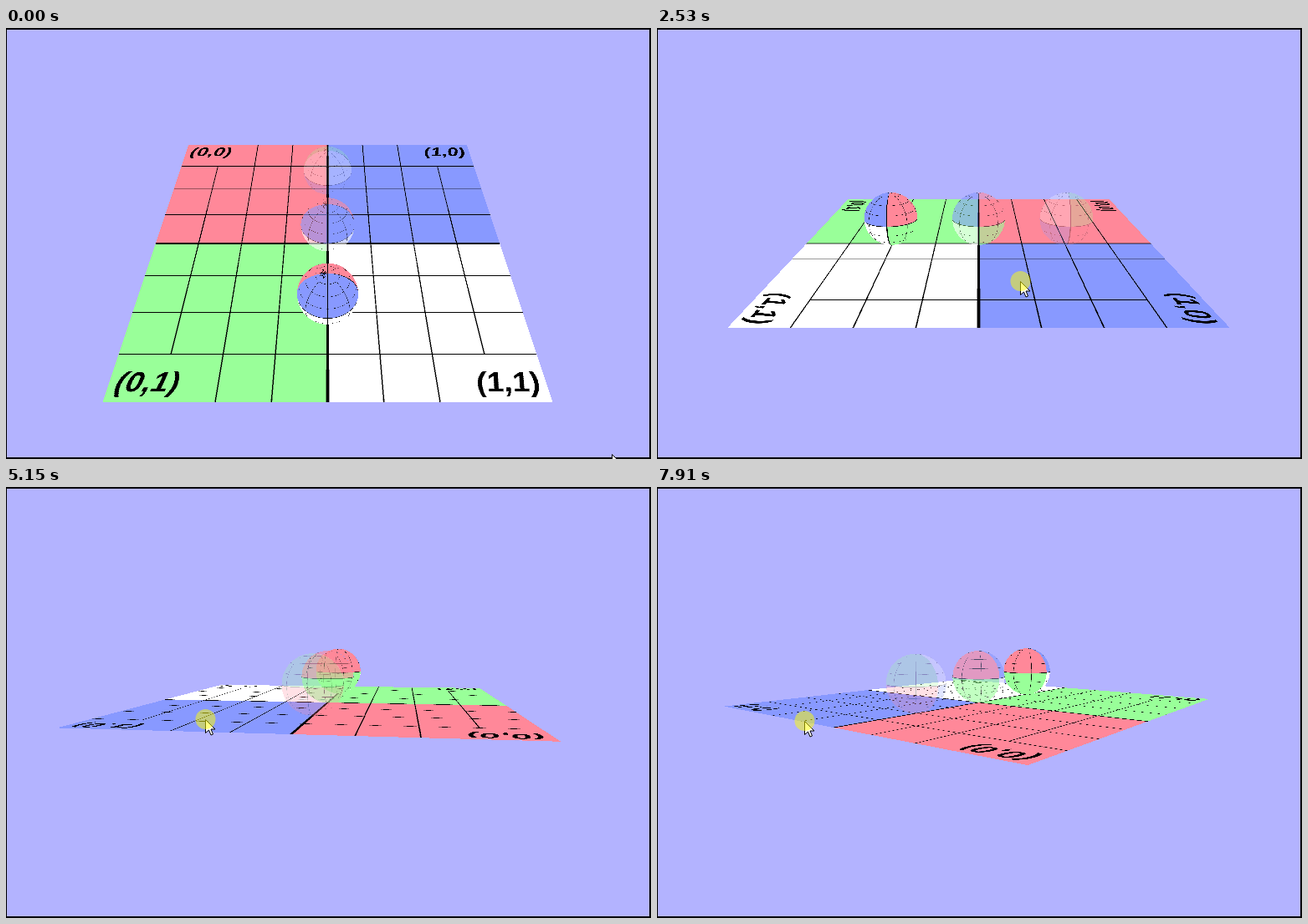
An HTML page with a canvas that plays this animation: 771 by 516 pixels, repeating every 7.99 s.

```html
<!DOCTYPE html>
<html lang="en">
<head>
<meta charset="utf-8">
<title>Texture coordinates on a plane and spheres</title>
<style>
  html, body { margin: 0; width: 100%; height: 100%; overflow: hidden; background: #b3b3ff; }
  canvas { display: block; }
</style>
</head>
<body>
<canvas id="stage" width="771" height="516"></canvas>
<script>
const W = 771, H = 516, CX = 384.5, CY = 258;
const FOCAL = 617, DIST = 3, RADIUS = 0.15;
const LOOP = 7990, STEP = 76.85, PRESS = 610;
const TEX = 1024, BG = 0xffffb3b3;

// Camera drag: time, yaw, elevation
const DRAG = [
  [530, 0, 45],
  [1300, 23.8, 34.8],
  [2530, 90, 19.6],
  [3450, 145, 9.9],
  [4380, 170, 6.9],
  [5300, 191.5, 7.3],
  [5680, 198, 7.5],
  [5990, 198, 7.5],
  [6070, 195.1, 7.45],
  [7140, 180, 8.4],
  [7910, 218.8, 8]
];

const SPHERES = [
  { z: 0.5, alpha: 1, flip: false },
  { z: 0, alpha: 0.6, flip: false },
  { z: -0.5, alpha: 0.25, flip: true }
];

const ctx = document.getElementById('stage').getContext('2d');
const image = ctx.createImageData(W, H);
const pixels = new Uint32Array(image.data.buffer);
const texels = makeTexture();

function makeTexture() {
  const canvas = document.createElement('canvas');
  canvas.width = canvas.height = TEX;
  const g = canvas.getContext('2d', { willReadFrequently: true });
  const half = TEX / 2, cell = TEX / 8;
  ['#ff8899', '#8899ff', '#99ff99', '#ffffff'].forEach((color, i) => {
    g.fillStyle = color;
    g.fillRect(i % 2 * half, (i >> 1) * half, half, half);
  });

  // Each line has a dark core and a softer rim
  for (let i = 1; i < 8; i++) {
    const inset = i === 1 || i === 7 ? cell : 0;
    const core = i === 4 ? 6 : 2;
    for (const [size, alpha] of [[core + 2, 0.4], [core, 1]]) {
      const edge = i * cell - size / 2;
      g.fillStyle = `rgba(0,0,0,${alpha})`;
      g.fillRect(edge, inset, size, TEX - 2 * inset);
      g.fillRect(0, edge, TEX, size);
    }
  }

  g.fillStyle = '#000';
  g.font = 'italic bold 72px "Liberation Sans", Arial, sans-serif';
  for (const u of [0, 1]) {
    for (const v of [0, 1]) {
      g.textAlign = u ? 'right' : 'left';
      g.fillText(`(${u},${v})`, u ? TEX - 16 : 16, v ? TEX - 27 : 67);
    }
  }
  return new Uint32Array(g.getImageData(0, 0, TEX, TEX).data.buffer);
}

function sample(u, v) {
  const x = Math.min(TEX - 1, u * TEX | 0);
  const y = Math.min(TEX - 1, v * TEX | 0);
  return texels[y * TEX + x];
}

function mix(under, over, a) {
  const channel = s => {
    const from = under >> s & 255;
    return Math.round(from + ((over >> s & 255) - from) * a) << s;
  };
  return (0xff000000 | channel(16) | channel(8) | channel(0)) >>> 0;
}

function slope(n, c) {
  const a = DRAG[n], b = DRAG[n + 1];
  return a && b ? (b[c] - a[c]) / (b[0] - a[0]) : null;
}

function tangent(n, c) {
  const before = slope(n - 1, c), after = slope(n, c);
  if (before === null) return 0;
  if (after === null) return before;
  return before * after > 0 ? 2 * before * after / (before + after) : 0;
}

// Monotone cubic through the drag points
function cameraAngle(t, c) {
  const next = DRAG.findIndex(key => key[0] > t);
  if (next === 0) return DRAG[0][c];
  if (next < 0) return DRAG[DRAG.length - 1][c];
  const i = next - 1, a = DRAG[i], b = DRAG[next];
  const span = b[0] - a[0], p = (t - a[0]) / span, q = 1 - p;
  return a[c] * (1 + 2 * p) * q * q + b[c] * (3 - 2 * p) * p * p
    + span * p * q * (tangent(i, c) * q - tangent(next, c) * p);
}

// The pointer glides in, then drags the view at two pixels per degree
function pointerAt(t, yaw, elevation) {
  const glide = (from, to, begin) => {
    const p = Math.max(0, Math.min(1, (t - begin) / 150));
    return from + (to - from) * p;
  };
  return [
    glide(glide(724, 624, 0), 614, 230) - 2 * yaw,
    glide(glide(510, 377, 0), 353.5, 230) + 2 * (elevation - 45)
  ];
}

function makeCamera(yaw, elevation) {
  const f = yaw * Math.PI / 180, e = elevation * Math.PI / 180;
  const sf = Math.sin(f), cf = Math.cos(f), s = Math.sin(e), c = Math.cos(e);
  return {
    right: [cf, 0, -sf],
    up: [-sf * s, c, -cf * s],
    back: [sf * c, s, cf * c]
  };
}

function ray(cam, x, y, out) {
  const px = x + 0.5 - CX, py = CY - y - 0.5;
  for (let i = 0; i < 3; i++) {
    out[i] = cam.right[i] * px + cam.up[i] * py - cam.back[i] * FOCAL;
  }
}

const dot = (a, b) => a[0] * b[0] + a[1] * b[1] + a[2] * b[2];
const dir = [0, 0, 0];

function drawPlane(cam) {
  const eye = cam.back.map(v => v * DIST);
  for (let y = 0, n = 0; y < H; y++) {
    for (let x = 0; x < W; x++, n++) {
      ray(cam, x, y, dir);
      pixels[n] = BG;
      if (dir[1] >= 0) continue;
      const k = -eye[1] / dir[1];
      const u = (eye[0] + k * dir[0] + 1) / 2;
      const v = (eye[2] + k * dir[2] + 1) / 2;
      if (u >= 0 && u < 1 && v >= 0 && v < 1) pixels[n] = sample(u, v);
    }
  }
}

function drawSphere(cam, ball) {
  const center = [0, RADIUS, ball.z];
  const depth = DIST - dot(center, cam.back);
  const mx = CX + FOCAL * dot(center, cam.right) / depth;
  const my = CY - FOCAL * dot(center, cam.up) / depth;
  const reach = FOCAL * RADIUS / depth + 4;
  const from = cam.back.map((v, i) => v * DIST - center[i]);
  const c = dot(from, from) - RADIUS * RADIUS;

  for (let y = Math.floor(my - reach); y <= my + reach; y++) {
    for (let x = Math.floor(mx - reach); x <= mx + reach; x++) {
      ray(cam, x, y, dir);
      const a = dot(dir, dir), b = dot(from, dir), disc = b * b - a * c;
      if (disc < 0) continue;
      const k = (-b - Math.sqrt(disc)) / a;
      const nx = from[0] + k * dir[0];
      const ny = (from[1] + k * dir[1]) / RADIUS;
      const nz = from[2] + k * dir[2];
      const u = 0.5 + Math.atan2(nz, nx) / (2 * Math.PI);
      const v = Math.acos(Math.max(-1, Math.min(1, ny))) / Math.PI;
      const n = y * W + x;
      pixels[n] = mix(pixels[n], sample(u, ball.flip ? 1 - v : v), ball.alpha);
    }
  }
}

function drawBorder() {
  ctx.fillStyle = '#000';
  ctx.fillRect(0, 0, W, 2);
  ctx.fillRect(0, 0, 1, H);
  ctx.fillRect(W - 2, 0, 2, H);
  ctx.fillRect(0, H - 2, W, 2);
}

function drawPointer(x, y, pressed) {
  ctx.save();
  ctx.translate(Math.round(x) + 0.5, Math.round(y) + 0.5);
  ctx.fillStyle = '#fff';
  ctx.strokeStyle = '#000';
  const arrow = new Path2D('M0 0V16L4 12.5L6.5 18.5L9 17.5L6.5 11.5H11.5Z');
  ctx.fill(arrow);
  ctx.stroke(arrow);
  if (pressed) {
    ctx.fillStyle = 'rgba(255,255,0,0.5)';
    ctx.beginPath();
    ctx.arc(0, -0.5, 12, 0, 2 * Math.PI);
    ctx.fill();
  }
  ctx.restore();
}

function render(t) {
  const yaw = cameraAngle(t, 1), elevation = cameraAngle(t, 2);
  const cam = makeCamera(yaw, elevation);
  drawPlane(cam);
  const depth = ball => -ball.z * cam.back[2];
  [...SPHERES].sort((a, b) => depth(b) - depth(a))
    .forEach(ball => drawSphere(cam, ball));
  ctx.putImageData(image, 0, 0);
  drawBorder();
  drawPointer(...pointerAt(t, yaw, elevation), t >= PRESS);
}

const start = performance.now();
let shown = -1;

function tick() {
  const t = (performance.now() - start) % LOOP;
  const step = Math.min(103, Math.floor((t + 9.9) / STEP));
  if (step !== shown) {
    shown = step;
    render(Math.floor(step * STEP / 10) * 10);
  }
  requestAnimationFrame(tick);
}
tick();
</script>
</body>
</html>
```
